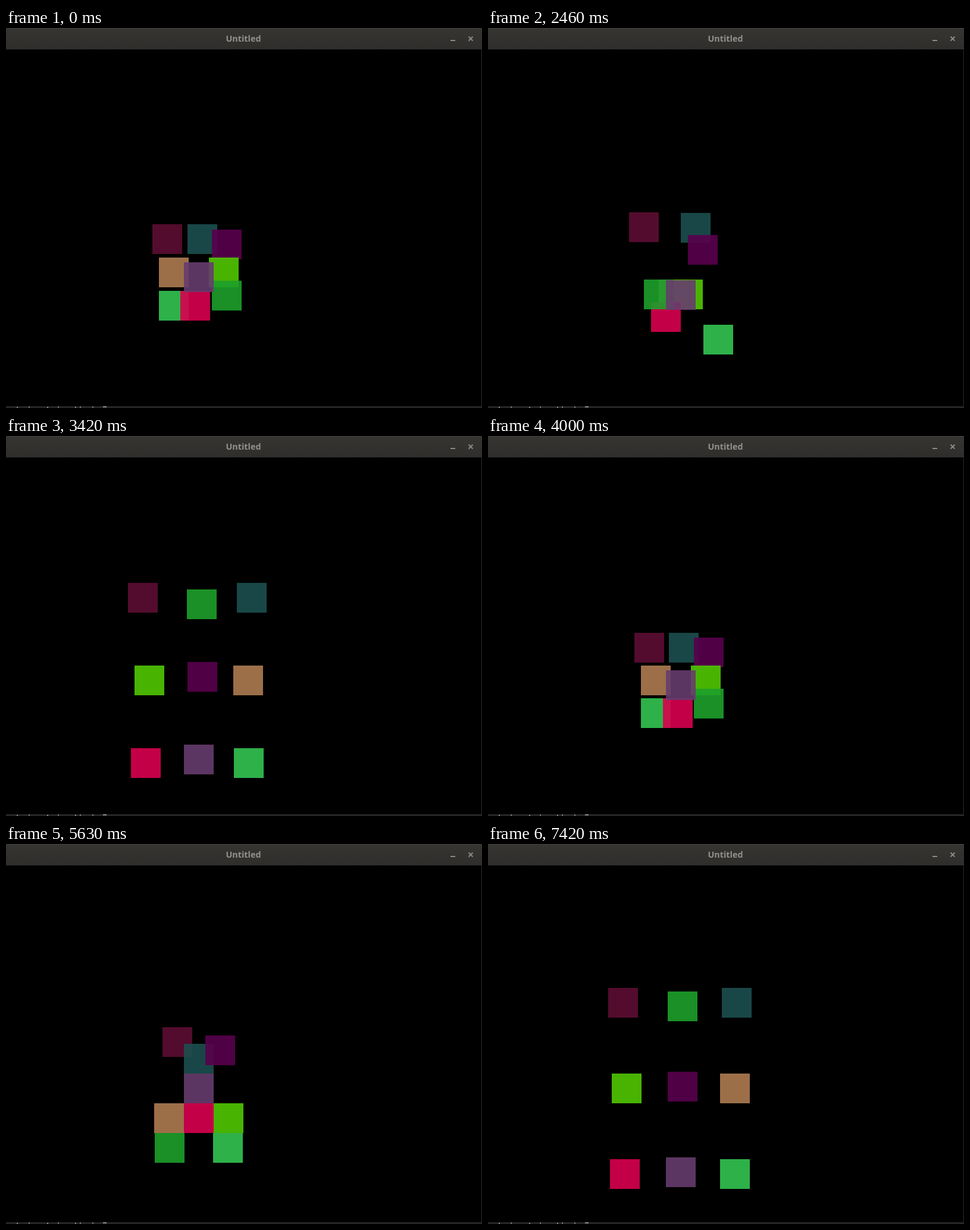
Write an HTML page that moves like this. It is 800x639 px and loops after 7460 ms.

```html
<!DOCTYPE html>
<html lang="en">
<head>
<meta charset="utf-8">
<title>Untitled</title>
<style>
  html, body { margin: 0; width: 100%; height: 100%; overflow: hidden; background: #000; }
  svg { display: block; width: 800px; height: 639px; }
  text { font: bold 14.4px "Open Sans", "Noto Sans", sans-serif; fill: #93918b; text-anchor: middle; }
</style>
</head>
<body>
<svg viewBox="0 0 800 639">
  <defs>
    <linearGradient id="bar" x2="0" y2="1">
      <stop offset="0" stop-color="#363532"/>
      <stop offset="1" stop-color="#2f2e2c"/>
    </linearGradient>
  </defs>
  <rect width="800" height="639"/>
  <g id="squares" opacity="1" shape-rendering="crispEdges"></g>
  <rect width="800" height="36" fill="url(#bar)"/>
  <rect width="800" height="1" fill="#42413e"/>
  <text x="399" y="23">Untitled</text>
  <rect x="747" y="20" width="8" height="2" fill="#8b8983"/>
  <path d="M777.5 14.5l7 7m0-7l-7 7" stroke="#8b8983" stroke-width="2"/>
  <rect x="799" y="36" width="1" height="603" fill="#2b2b2b"/>
  <rect y="636" width="800" height="3" fill="#262626"/>
  <path d="M18 638h2M38 637.5h2M69 638h2M87 637.5h2M116 638h2M124 637.5h2M145 637.5h2M163 637h6"
        stroke="#8a8a80" stroke-width="2"/>
</svg>
<script>
const LOOP = 7460, FRAME = 1000 / 24, LAST = 178;
const SIZE = 50, ALPHA = 0.9;

// Each square holds the letter that places it in the layouts below; listed back to front.
const COLORS = {
  m: "#5c0e32", t: "#1c4f4f", p: "#59004d", a: "#ad7c52", l: "#51c703",
  g: "#34c552", c: "#d9004f", d: "#1da02b", v: "#663c6e"
};

// Reads a letter map into positions; the first row and column start at (x, y).
function layout(x, y, dx, dy, rows) {
  const places = {};
  rows.forEach((row, j) => [...row].forEach((key, i) => {
    if (key !== " ") places[key] = [x + i * dx, y + j * dy];
  }));
  return places;
}

const block = layout(249, 336, 50, 50, ["mtp", "avl", "gcd"]);
const tower = layout(249, 236, 50, 50, [" m ", " p ", " t ", " v ", "acl", "d g"]);
const robot = layout(249, 336, 50, 50, ["mtp", " v ", "acl", "d g"]);
const wide  = layout(199, 236, 100, 150, ["mdt", "lpa", "cvg"]);

// Exponential approach to each layout; knots are [time, decay exponent].
const legs = [
  [block, [-630, 0], [0, 2.9], [360, 5]],
  [tower, [360, 0], [750, 1.71], [1080, 3.1], [1395, 5]],
  [robot, [1396, 0], [1500, 0.478], [2210, 5]],
  [wide,  [2405, 0], [2460, 0.301], [3040, 3.9], [3390, 5.4]],
  [block, [3392, 0], [3420, 0.128], [3790, 1.83], [4390, 5]],
  [tower, [4390, 0], [4540, 0.693], [4750, 1.537], [5210, 3.9]],
  [robot, [5375, 0], [6370, 5]],
  [wide,  [6375, 0], [6500, 0.589], [6830, 3.06], [7400, 5.4]],
  [block, [7404, 0], [7420, 0.073], [7460, 0.26]]
];

function decay(knots, time) {
  for (let i = 1; i < knots.length; i++) {
    const [t0, d0] = knots[i - 1], [t1, d1] = knots[i];
    if (time < t1) return d0 + (d1 - d0) * (time - t0) / (t1 - t0);
  }
  return knots[knots.length - 1][1];
}

function position(key, time) {
  let [x, y] = wide[key];
  for (const [target, ...knots] of legs) {
    if (time <= knots[0][0]) break;
    const done = 1 - Math.exp(-decay(knots, time));
    x += (target[key][0] - x) * done;
    y += (target[key][1] - y) * done;
  }
  return [Math.round(x), Math.round(y)];
}

const group = document.getElementById("squares");
const squares = Object.entries(COLORS).map(([key, fill]) => {
  const node = document.createElementNS("http://www.w3.org/2000/svg", "rect");
  const attrs = { width: SIZE, height: SIZE, fill, "fill-opacity": ALPHA };
  for (const name in attrs) node.setAttribute(name, attrs[name]);
  group.append(node);
  return { key, node };
});

function draw(ms) {
  const frame = Math.min(LAST, Math.floor((ms % LOOP + 5) / FRAME));
  for (const { key, node } of squares) {
    const [x, y] = position(key, frame * FRAME);
    node.setAttribute("x", x);
    node.setAttribute("y", y);
  }
}

const start = performance.now();
function tick() {
  draw(performance.now() - start);
  requestAnimationFrame(tick);
}
draw(0);
requestAnimationFrame(tick);
</script>
</body>
</html>
```
